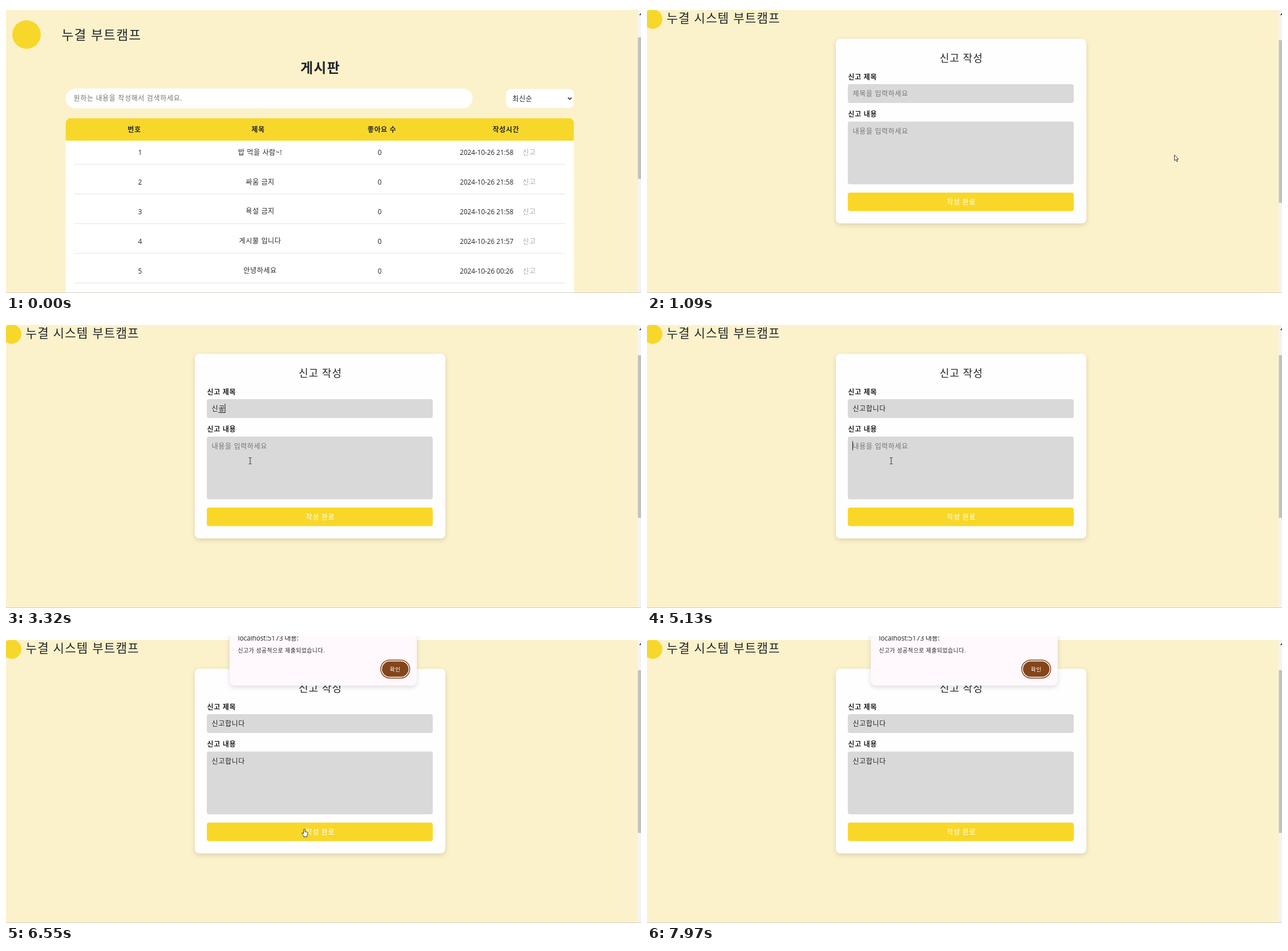
Recreate the animation shown at these times as an HTML page. Size 1113 px wide and 503 px high, loop 8.32 s.

```html
<!DOCTYPE html>
<html lang="ko">
<head>
<meta charset="utf-8">
<title>게시판 신고</title>
<style>
html, body { margin: 0; width: 100%; height: 100%; overflow: hidden; background: #fff; }
svg { display: block; width: 100vw; height: 100vh; }
text {
  font: 12px "Open Sans", "Noto Sans CJK KR", "Noto Sans CJK", sans-serif;
  letter-spacing: .055em; fill: #212529; white-space: pre;
}
.b { font-weight: 700; }
.m { text-anchor: middle; }
.hint { fill: #757575; }
.latin { font-size: 11.7px; letter-spacing: 0; }
.card { filter: drop-shadow(0 3px 4px rgba(0, 0, 0, .13)); }
</style>
</head>
<body>
<svg viewBox="0 0 1113 503">
  <rect y="7" width="1107" height="496" fill="#fbf2cb"/>
  <rect x="1107" y="7" width="6" height="496" fill="#f3f3f3"/>
  <path d="M1109.5 16l3.5-4v4z" fill="#505050"/>
  <rect id="thumb" x="1107.5" width="5.5" fill="#c1c1c1"/>

  <g id="board">
    <circle cx="36" cy="50" r="25" fill="#f8d72b"/>
    <text x="97.5" y="58.5" style="font-size:22.7px">누결 부트캠프</text>
    <text class="b m" x="551" y="117" style="font-size:24px">게시판</text>
    <rect x="104.7" y="144.7" width="713" height="34.5" rx="17.2" fill="#fff"/>
    <text class="hint" x="118.5" y="166">원하는 내용을 작성해서 검색하세요.</text>
    <rect x="876.6" y="145.6" width="118.8" height="33" rx="8" fill="#fff"/>
    <text x="887.5" y="166.5">최신순</text>
    <path d="M985 160.5l3.2 3.2 3.2-3.2" fill="none" stroke="#111" stroke-width="1.5"/>
    <rect x="104.7" y="230" width="890.6" height="273" fill="#fff"/>
    <path d="M104.7 236v-31.200a8 8 0 0 1 8-8h874.600a8 8 0 0 1 8 8v31.200z" fill="#f8d72b"/>
  </g>

  <g id="form">
    <svg y="7" width="60" height="40"><circle cx="10" cy="16" r="17" fill="#f8d72b"/></svg>
    <text x="34.5" y="29" style="font-size:21.2px">누결 시스템 부트캠프</text>
    <rect class="card" x="331" y="57.5" width="439" height="323.5" rx="8" fill="#fefefe"/>
    <text class="m" x="551" y="97.8" style="font-size:18px">신고 작성</text>
    <text class="b" x="352.5" y="128.6">신고 제목</text>
    <rect x="352" y="137" width="396" height="33" rx="4" fill="#d9d9d9"/>
    <text class="b" x="352.5" y="194.2">신고 내용</text>
    <rect x="352" y="202.5" width="396" height="110" rx="4" fill="#d9d9d9"/>
    <rect x="352" y="327" width="396" height="32.5" rx="4" fill="#f9d728"/>
    <text class="m" x="550.8" y="347.6" style="fill:#fff">작성 완료</text>
  </g>

  <rect y="502" width="1113" height="1" fill="#cfccc0"/>

  <g id="dialog">
    <rect class="card" x="392" y="-40" width="328" height="127" rx="9" fill="#fff8fc"/>
    <text class="latin" x="406.5" y="8">localhost:5173 내용:</text>
    <text x="406.5" y="28.8" style="font-size:9.8px">신고가 성공적으로 제출되었습니다.</text>
    <rect x="656.8" y="42.2" width="50.8" height="31.5" rx="15.7" fill="#fff" stroke="#84451a" stroke-width="1.5"/>
    <rect x="659" y="44.5" width="46.5" height="27" rx="13.5" fill="#84451a"/>
    <text class="m" x="682.2" y="61.7" style="font-size:9.6px;fill:#fff">확인</text>
  </g>

  <g id="cursor">
    <circle id="halo" r="8" fill="#ff0" fill-opacity=".6"/>
    <path id="arrow" d="M0 0v10l2.3-2 1.8 3.7 1.6-.8-1.7-3.5h3z" fill="#fff" stroke="#222" stroke-width=".9"/>
    <path id="beam" d="M-2.5-5.5h2l.5.5.5-.5h2M0-5V5M-2.5 5.5h2L0 5l.5.5h2" fill="none" stroke="#333"/>
    <path id="hand" d="M-1.3 8V1q0-1.2 1.2-1.2T1.1 1v3.8q1-.7 1.8.2 1-.5 1.6.4 1.5-.2 1.5 1.4 0 3.700-1.500 5v1.700H-1V12Q-3 10-4.300 7.800q-.5-1.500 1-1.400z" fill="#fff" stroke="#222" stroke-width=".9"/>
  </g>
</svg>

<script>
const LOOP = 8320;
const $ = id => document.getElementById(id);

function add(parent, tag, attrs, text = '') {
  const el = document.createElementNS('http://www.w3.org/2000/svg', tag);
  for (const key in attrs) el.setAttribute(key, attrs[key]);
  el.textContent = text;
  parent.append(el);
  return el;
}
const show = (el, on) => { el.style.display = on ? '' : 'none'; };
const within = (t, spans) => spans.some(([a, b]) => t >= a && t < b);

// Board table
const board = $('board');
[['번호', 225], ['제목', 442], ['좋아요 수', 659], ['작성시간', 876.3]].forEach(([s, x]) =>
  add(board, 'text', { class: 'b m', x, y: 221 }, s));

const reports = [['밥 먹을 사람~!', '26 21:58'], ['싸움 금지', '26 21:58'], ['욕설 금지', '26 21:58'],
  ['게시물 입니다', '26 21:57'], ['안녕하세요', '26 00:26']].map(([title, time], i) => {
  const y = 261.2 + i * 51.85;
  add(board, 'text', { class: 'm', x: 235.3, y }, i + 1);
  add(board, 'text', { class: 'm', x: 445.5, y: y - .5 }, title);
  add(board, 'text', { class: 'm', x: 655.3, y }, 0);
  add(board, 'text', { class: 'latin', x: 795.5, y }, '2024-10-' + time);
  add(board, 'rect', { x: 120, y: 277 + i * 52, width: 860, height: 1, fill: '#e3e3e3' });
  return add(board, 'text', { x: 905.5, y }, '신고');
});

// Text fields with Hangul composition
const STAGES = ['ㅅ', '시', '신', '신ㄱ', '신고', '신곻', '신고하', '신고합',
  '신고합ㄴ', '신고합니', '신고합닏', '신고합니다'];
const LEFT = 360.5, ADVANCE = 11.7;

function field(y, hint, keys, caretOn, composeEnd) {
  const text = add($('form'), 'text', { x: LEFT, y });
  const line = add($('form'), 'rect', { y: y + 2, height: 1, width: ADVANCE, fill: '#222' });
  const caret = add($('form'), 'rect', { y: y - 13, height: 16, width: 1, fill: '#111' });
  return t => {
    const value = STAGES[keys.filter(k => t >= k).length - 1] || '';
    const end = LEFT + value.length * ADVANCE;
    text.textContent = value || hint;
    text.setAttribute('class', value ? '' : 'hint');
    line.setAttribute('x', end - ADVANCE);
    caret.setAttribute('x', end - .5);
    show(line, value && t < composeEnd);
    show(caret, within(t, caretOn));
  };
}

const fields = [
  field(158, '제목을 입력하세요',
    [2720, 2790, 2930, 3030, 3120, 3320, 3420, 3520, 3720, 3810, 3900, 3980],
    [[1960, 2580], [2720, 4510]], 5000),
  field(223.6, '내용을 입력하세요', STAGES.map((_, i) => 5390 + i * 48),
    [[5065, 6200]], 6060)
];

// Pointer: time, x, y
const PATH = [[190, 1092, 454], [1010, 924.5, 261], [1090, 924.5, 261], [1890, 422, 152], [1960, 422, 152],
  [2250, 428, 245], [5600, 428, 245], [6060, 520, 346], [6200, 520, 346], [6550, 523, 338.5],
  [7030, 648, 46], [7900, 1058, 500], [LOOP, 1058, 500]];
const CLICKS = [[1010, 1090], [1890, 1960], [5000, 5130], [6060, 6200]];

function pointerAt(t) {
  const i = Math.max(1, PATH.findIndex(p => p[0] > t));
  const [t0, x0, y0] = PATH[i - 1], [t1, x1, y1] = PATH[i];
  const p = Math.min(1, Math.max(0, (t - t0) / (t1 - t0)));
  const e = p * p * (3 - 2 * p);
  return [x0 + (x1 - x0) * e, y0 + (y1 - y0) * e];
}

function draw(t) {
  const onBoard = t < 1090, modal = t >= 6200;
  show($('board'), onBoard);
  show($('form'), !onBoard);
  $('thumb').setAttribute('y', onBoard ? 55 : 60);
  $('thumb').setAttribute('height', onBoard ? 248 : 285);
  show($('dialog'), modal);
  $('dialog').style.opacity = Math.min(1, (t - 6130) / 210);
  fields.forEach(update => update(t));

  const [x, y] = pointerAt(t);
  const visible = t >= 190 && t < 7970;
  const inside = (l, top, r, b) => x >= l && x <= r && y >= top && y <= b;
  let overReport = false;
  reports.forEach((el, i) => {
    const top = 248 + i * 51.85;
    const hot = visible && onBoard && inside(905, top, 930, top + 18);
    el.style.fill = hot ? '#e02020' : '#aaa';
    overReport = overReport || hot;
  });
  const hand = overReport || !onBoard && inside(352, 327, 748, 360);
  const beam = !onBoard && !modal && (inside(352, 137, 748, 170) || inside(352, 202, 748, 313));
  show($('cursor'), visible);
  $('cursor').setAttribute('transform', `translate(${x} ${y})`);
  show($('hand'), hand);
  show($('beam'), beam);
  show($('arrow'), !hand && !beam);
  show($('halo'), within(t, CLICKS));
}

const start = performance.now();
function tick() {
  draw((performance.now() - start) % LOOP);
  requestAnimationFrame(tick);
}
tick();
</script>
</body>
</html>
```
